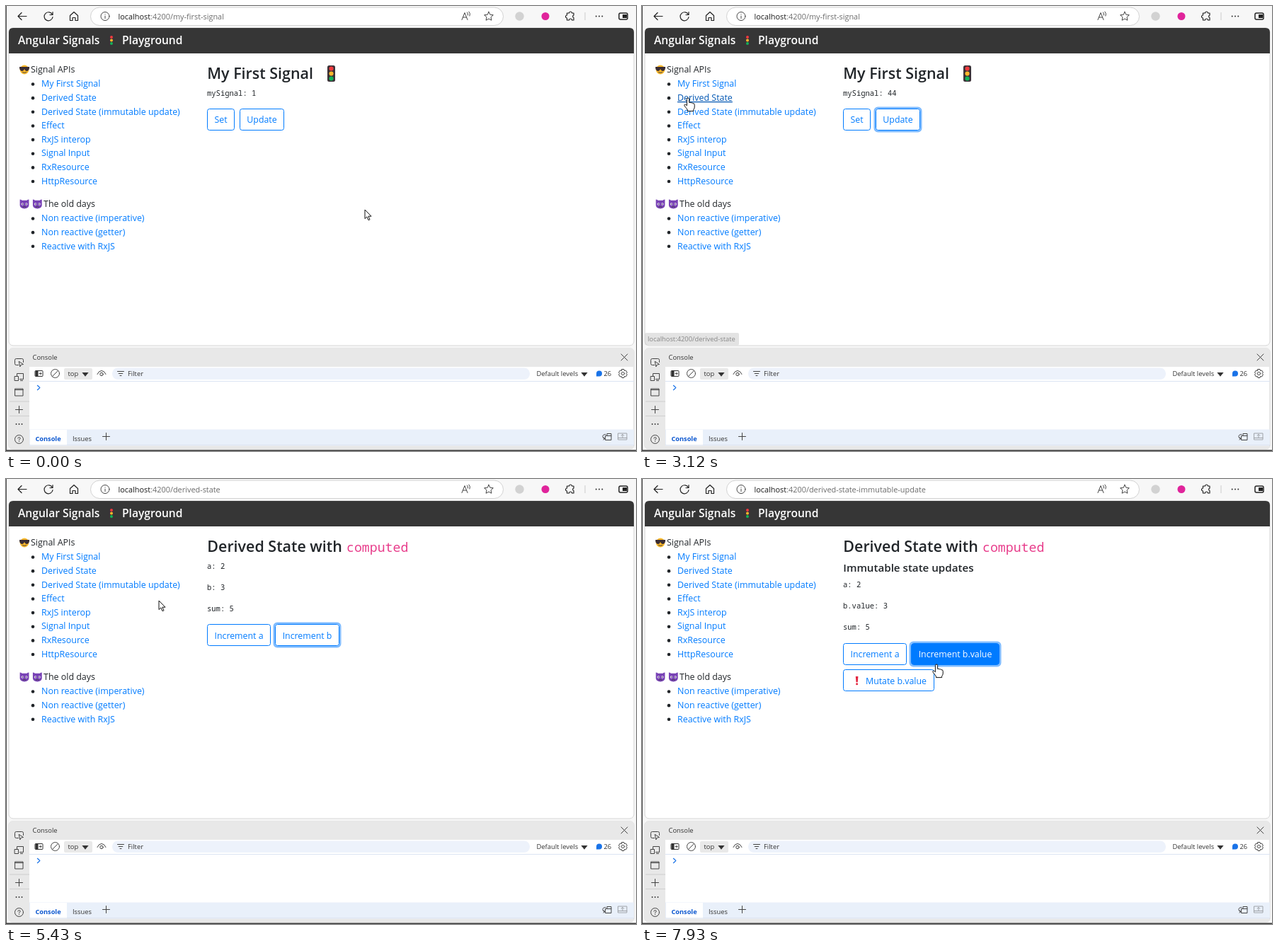
Recreate the animation shown at these times as an HTML page. Size 890 by 629 pixels, loop 8 s.

```html
<!DOCTYPE html>
<html lang="en">
<head>
<meta charset="utf-8">
<title>Angular Signals Playground</title>
<style>
html, body { margin: 0; width: 100%; height: 100%; overflow: hidden; background: #f7f7f7; }
svg { display: block; width: 890px; height: 629px; }
text { font-family: "Open Sans", "Noto Sans", sans-serif; font-size: 12.45px; fill: #212529; white-space: pre; }
.mono { font-family: "Noto Sans Mono", monospace; font-size: 10.5px; }
.code { font-family: "Noto Sans Mono", monospace; font-size: 18.2px; fill: #e83e8c; }
.brand { font-size: 15.6px; font-weight: 600; fill: #fff; }
.h2 { font-size: 21.45px; font-weight: 600; }
.h3 { font-size: 15.15px; font-weight: 600; }
.link { fill: #007bff; }
.on { text-decoration: underline; fill: #0056b3; }
.btn { font-size: 12.35px; text-anchor: middle; fill: #007bff; }
.btn.hot { fill: #fff; }
.url { font-size: 10.9px; fill: #6b6b6b; }
.ui { font-size: 9.4px; fill: #333; }
.tab { font-size: 9.2px; font-weight: 700; fill: #0b57d0; }
.tip { font-size: 9.35px; fill: #111; }
.i { fill: none; stroke: #444; stroke-width: 1; stroke-linecap: round; stroke-linejoin: round; }
.n { stroke: #222; stroke-width: 1.2; }
.blue { stroke: #1a73e8; stroke-width: 1.2; }
</style>
</head>
<body>
<svg viewBox="0 0 890 629"><g id="chrome"></g><g id="live"></g></svg>
<script>
const LOOP = 8000;
const BLUE = '#007bff';

const text = (x, y, str, cls = '') => `<text x="${x}" y="${y}" class="${cls}">${str}</text>`;
const rect = (x, y, w, h, fill, r = 0, more = '') =>
  `<rect x="${x}" y="${y}" width="${w}" height="${h}" rx="${r}" fill="${fill}" ${more}/>`;
const dot = (x, y, r, fill) => `<circle cx="${x}" cy="${y}" r="${r}" fill="${fill}"/>`;
const ring = (x, y, r, cls = 'i') => `<circle cx="${x}" cy="${y}" r="${r}" class="${cls}"/>`;
const icon = (x, y, d, cls = 'i') => `<path transform="translate(${x} ${y})" d="${d}" class="${cls}"/>`;
const shape = (x, y, d, fill) => `<path transform="translate(${x} ${y})" d="${d}" fill="${fill}"/>`;
const dots = (x, y, gap, r) => [-gap, 0, gap].map(d => dot(x + d, y, r, '#333')).join('');

const trafficLight = (x, y, s) => `<g transform="translate(${x} ${y}) scale(${s})">` +
  rect(-5.5, -11.5, 11, 23, '#3b3238', 2.5) +
  dot(0, -7, 3.1, '#f03a3e') + dot(0, 0, 3.1, '#fcb72b') + dot(0, 7, 3.1, '#12b358') + '</g>';

const coolFace = (x, y) => dot(x, y, 6.4, '#fdb92c') +
  shape(x, y, 'M-7-4H7V-2Q6 2 3 2 1 2 0-1-1 2-3 2-6 2-7-2Z', '#3a2d33') +
  icon(x, y, 'M-2.6 3.7Q0 5.2 2.6 3.7');

const imp = (x, y) =>
  shape(x, y, 'M-6.4-6.4Q-4.6-6.4-3.4-5.2H3.4Q4.6-6.4 6.4-6.4V2Q5.4 6.4 0 6.4T-6.4 2Z', '#7842b5') +
  dot(x - 2.8, y, 1.7, '#e9dcf5') + dot(x + 2.8, y, 1.7, '#e9dcf5') +
  dot(x - 2.5, y, .8, '#33204a') + dot(x + 2.5, y, .8, '#33204a') +
  icon(x, y, 'M-2 4Q0 3 2 4');

function browserBar() {
  return rect(0, 0, 890, 629, '#f7f7f7') +
    icon(23, 14.5, 'M6 0H-6M-1-5L-6 0L-1 5', 'i n') +
    icon(60, 14.5, 'M5.6-2A6 6 0 1 0 6 1M6-6V-2H2', 'i n') +
    icon(96, 14.5, 'M-5.5-1L0-6L5.5-1V6H2V2H-2V6H-5.5Z', 'i n') +
    rect(119.5, 2, 583, 25.5, '#fff', 12.7, 'stroke="#d2d2d2"') +
    ring(140, 14.5, 6) + icon(140, 14.5, 'M0-.5V3M0-3V-2.8') +
    icon(648, 14.5, 'M-4 5L0-5L4 5M-2.6 1.5H2.6M3.5-5.5Q5-4 4.4-1.5M6-6.5Q8.5-4 7-.5') +
    icon(682, 14.5, 'M0-6.3L1.9-2.3 6.3-1.8 3 1.3 3.9 5.7 0 3.5-3.9 5.7-3 1.3-6.3-1.8-1.9-2.3Z') +
    dot(725.5, 14.5, 6.2, '#d2d2d2') + dot(762, 14.5, 5.5, '#e0249b') +
    icon(797, 14.5, 'M-4.5-4.5H-1.5A2 2 0 0 1 2.5-4.5H5V-1.5A1.8 1.8 0 0 0 5 2V5.5H2.5A2 2 0 0 0-1.5 5.5H-4.5V2.5A2 2 0 0 1-4.5-1.5Z', 'i n') +
    rect(817.5, 9, 1, 11, '#ccc') + dots(838, 14.5, 4.3, 1) +
    rect(866, 10, 12, 9, '#fff', 2, 'stroke="#222" stroke-width="1.5"') + rect(871, 12, 6, 5, '#222');
}

function devtools() {
  return rect(4, 484, 883, 142, '#fff', 5, 'stroke="#d5d5d5"') +
    shape(0, 0, 'M4 489Q4 484 9 484H882Q887 484 887 489V510H33V622H887Q887 626 882 626H9Q4 626 4 621Z', '#e8e8e8') +
    text(37.5, 500, 'Console', 'ui') + icon(873.5, 496.5, 'M-4.5-4.5L4.5 4.5M4.5-4.5L-4.5 4.5') +
    // left rail
    icon(18.5, 503.5, 'M-1 4H-4Q-6 4-6 2V-3Q-6-5-4-5H4Q6-5 6-3V0M0-1L6 3L3 3.5L1.5 6Z') +
    icon(18.5, 524.5, 'M-3-1V-5H6V3H1M-6-1H-1V5H-6ZM2 5H5') +
    icon(18.5, 546, 'M-5.5-5H5.5V5H-5.5ZM-5.5-3.5H5.5') +
    rect(5, 558.5, 28, 1, '#cfcfcf') + rect(5, 579, 28, 1, '#cfcfcf') +
    icon(18.5, 570.5, 'M-5 0H5M0-5V5') + dots(18.5, 591, 4, .9) +
    ring(18.5, 612.5, 6) + icon(18.5, 612.5, 'M-1.6-1.4Q-1.4-3 0-3T1.6-1.4Q1.6-.4 0 .6V1.2M0 3V3.2') +
    // filter row
    rect(41, 515.5, 11, 8, 'none', 1, 'stroke="#333"') + rect(41.5, 516, 4, 7, '#333') +
    icon(48.5, 519.5, 'M-1.5 0H1.5M0-1.5L1.5 0L0 1.5') +
    ring(69.5, 519.5, 6) + icon(69.5, 519.5, 'M4-4L-4 4') +
    rect(82, 512, 40, 16, '#e9e9e9', 2) + text(87.5, 523, 'top', 'ui') +
    shape(112, 520.5, 'M-4.6-2.5H4.6L0 3.3Z', '#333') +
    icon(135, 519.5, 'M-6 1Q-4-4 0-4T6 1') + ring(135, 520.5, 2.2) +
    rect(150, 511.5, 590, 16.5, '#edf2fb', 8) +
    icon(162, 519.5, 'M-4.5-3H4.5M-2.8 0H2.8M-1 3H1') + text(172, 523, 'Filter', 'ui') +
    text(749.5, 523, 'Default levels', 'ui') + shape(817, 520.5, 'M-4.6-2.5H4.6L0 3.3Z', '#333') +
    shape(838, 519.5, 'M-4 4V0A4 4 0 1 1 0 4Z', '#1a73e8') + text(844.5, 523, '26', 'ui') +
    ring(871.5, 519.5, 2.1) +
    icon(871.5, 519.5, 'M-1.5-6H1.5L2-4 4-4.5 6-1.5 4.6 0 6 1.5 4 4.5 2 4 1.5 6H-1.5L-2 4-4 4.5-6 1.5-4.6 0-6-1.5-4-4.5-2-4Z') +
    rect(33, 530, 854, 1, '#dbe4f3') + icon(46, 539.5, 'M-1.6-3.2L1.8 0L-1.6 3.2', 'i blue') +
    // drawer tabs
    rect(33, 598.5, 854, 22.5, '#e9f0fa') + rect(34, 599, 52, 22, '#fff') + rect(33, 620.5, 854, 1, '#d3dcea') +
    text(41.5, 615, 'Console', 'tab') + text(94, 615, 'Issues', 'ui') +
    icon(141.5, 608.5, 'M-5 0H5M0-5V5') +
    icon(849, 608.5, 'M-2-1H6V5H-2ZM0-1V-4H6V-1M-2-3Q-6-3-6 0T-3 3M-5 1.5L-3 3L-5 4.5') +
    `<g opacity=".45">${icon(871, 608.5, 'M-6-4.5H6V4.5H-6ZM-6 2H6M-2-1L0-3L2-1M0-3V1')}</g>` +
    rect(0, 0, 1, 629, '#555') + rect(0, 627.5, 890, 1.5, '#3a3a3a');
}

function pageFrame() {
  return rect(4, 31, 883, 449, '#fff', 6, 'stroke="#d6d6d6"') +
    shape(0, 0, 'M4 67V37Q4 31 10 31H881Q887 31 887 37V67Z', '#363636') +
    text(17, 54, 'Angular Signals', 'brand') + trafficLight(149, 48.5, .64) + text(164, 54, 'Playground', 'brand') +
    coolFace(26, 90) + text(35, 94, 'Signal APIs') +
    imp(26, 280) + imp(44.3, 280) + text(53, 284, 'The old days');
}

const menu = [
  [110, ['My First Signal', 'Derived State', 'Derived State (immutable update)', 'Effect',
    'RxJS interop', 'Signal Input', 'RxResource', 'HttpResource']],
  [300, ['Non reactive (imperative)', 'Non reactive (getter)', 'Reactive with RxJS']]
];
const links = menu.flatMap(([top, labels]) => labels.map((label, i) => ({ label, y: top + i * 19.65 })));

const sums = name => n => {
  const a = n > 0 ? 2 : 1, b = n > 1 ? 3 : 2;
  return [`a: ${a}`, `${name}: ${b}`, `sum: ${a + b}`];
};
const button = (label, x, y, w) => ({ label, x, y, w });
const derivedHead = text(284.3, 103, 'Derived State with', 'h2') + text(481, 103, 'computed', 'code');

// clicks: [time, button index]
const views = [
  {
    at: 0, path: 'my-first-signal', top: 127,
    head: text(284.3, 103, 'My First Signal', 'h2') + trafficLight(459.5, 95.5, 1),
    rows: n => [`mySignal: ${[1, 42, 43, 44][n]}`],
    buttons: [button('Set', 284, 145, 39), button('Update', 330, 145, 63)],
    clicks: [[980, 0], [2200, 1], [2500, 1]]
  },
  {
    at: 3390, path: 'derived-state', top: 127,
    head: derivedHead,
    rows: sums('b'),
    buttons: [button('Increment a', 284, 205.4, 90), button('Increment b', 380, 205.4, 91)],
    clicks: [[4320, 0], [5160, 1]]
  },
  {
    at: 6210, path: 'derived-state-immutable-update', top: 153,
    head: derivedHead + text(284.3, 131, 'Immutable state updates', 'h3'),
    rows: sums('b.value'),
    buttons: [button('Increment a', 284, 231.6, 90), button('Increment b.value', 380, 231.6, 125),
      { ...button('Mutate b.value', 284, 269.3, 129), alert: true }],
    clicks: [[7180, 0], [7660, 1]]
  }
];

const ticks = [[0, 0, 1], [440, 1250, 7], [1510, 1780, 3], [2200, 3120, 7], [3240, 3240, 1],
  [3390, 4080, 6], [4320, 4320, 1], [4470, 4790, 3], [5160, 5430, 3], [5550, 6090, 5],
  [6210, 6330, 2], [6610, 6610, 1], [6850, 7510, 7], [7660, 7930, 3]]
  .flatMap(([a, b, n]) => Array.from({ length: n }, (_, i) => n > 1 ? a + (b - a) * i / (n - 1) : a));

const track = [[360, 507, 288], [845, 303, 158], [1375, 304, 158], [1780, 352, 160], [2520, 352, 160],
  [3120, 65, 130], [3400, 65, 130], [4080, 310, 213], [4320, 310, 213], [4790, 400, 216],
  [5160, 400, 216], [5430, 216, 172], [5685, 140, 149], [6400, 136, 148], [6610, 226, 182],
  [6960, 300, 236], [7300, 302, 240], [7510, 400, 248], [7660, 402, 250], [7930, 416, 262]];

// status bubble: [shown, solid, hidden, path, width]
const tips = [[3120, 3240, 3750, 'derived-state', 133],
  [6210, 6330, 6900, 'derived-state-immutable-update', 218]];

function pointer(t) {
  const k = track.findIndex(p => p[0] > t);
  if (k === 0) return track[0].slice(1);
  if (k < 0) return track[track.length - 1].slice(1);
  const [t0, x0, y0] = track[k - 1], [t1, x1, y1] = track[k];
  const f = (t - t0) / (t1 - t0);
  return [x0 + (x1 - x0) * f, y0 + (y1 - y0) * f];
}

function drawButton(b, hot, glow) {
  const y = Math.round(b.y);
  const shift = b.alert ? 10.5 : 0;
  let out = '';
  if (glow > 0) out += rect(b.x - 1.2, y - 1.2, b.w + 2.4, 33.4, 'none', 4.4,
    `stroke="${BLUE}" stroke-opacity="${glow * .5}" stroke-width="2.6"`);
  out += rect(b.x + .5, y + .5, b.w - 1, 30, hot ? BLUE : '#fff', 3, `stroke="${BLUE}"`);
  out += text(b.x + b.w / 2 + shift, Math.round(b.y + 20.3), b.label, hot ? 'btn hot' : 'btn');
  if (b.alert) out += shape(303.6, 285, 'M-1.8-6H1.8L1.1 2.2H-1.1Z', '#e3263f') + dot(303.6, 289.7, 1.5, '#e3263f');
  return out;
}

function drawPointer(x, y, hand) {
  const d = hand
    ? 'M-1.6 1.5Q-1.6 0 0 0T1.6 1.5V6.4Q3.2 5.6 4.3 6.9 5.9 6.2 6.8 7.7 9.2 7.2 9.2 9.7V13Q9.2 15 7.6 16.6V18.6H-.6V17Q-2 14.6-4.4 12-6 9.9-4.7 9.2-3.3 8.6-1.6 10.8Z'
    : 'M0 0V12.6L2.9 9.9L5 14.7L7 13.8L4.9 9.2H9Z';
  return `<path transform="translate(${x} ${y})" d="${d}" fill="#fff" stroke="#111" stroke-linejoin="round"/>`;
}

function render(t) {
  const view = views.filter(v => t >= v.at).pop();
  const done = view.clicks.filter(c => t >= c[0]);
  const last = done[done.length - 1], prev = done[done.length - 2];
  const glow = !last ? 0 : prev && prev[1] === last[1] ? 1 : Math.min(1, (t - last[0]) / 120);
  const [x, y] = pointer(t);
  let hand = false;
  const over = hit => { hand = hand || hit; return hit; };

  let out = `<text x="158.5" y="18.7" class="url"><tspan fill="#1b1b1b">localhost</tspan>:4200/${view.path}</text>`;
  for (const l of links) {
    const hot = over(Math.abs(y - l.y) < 8 && x > 50 && x < 50 + l.label.length * 6.2);
    out += dot(38, l.y + .5, 2.3, '#212529') + text(50, Math.round(l.y + 4.2), l.label, hot ? 'link on' : 'link');
  }
  out += view.head;
  view.rows(done.length).forEach((row, i) => out += text(284, view.top + i * 30.2, row, 'mono'));
  view.buttons.forEach((b, i) => {
    const hot = over(x > b.x && x < b.x + b.w && y > b.y && y < b.y + 31);
    out += drawButton(b, hot, last && last[1] === i ? glow : 0);
  });
  for (const [from, solid, end, path, w] of tips) {
    if (t < from || t >= end) continue;
    out += `<g opacity="${t < solid ? .5 : 1}">` + rect(4, 462, w, 17.5, '#c9c9c9', 2) +
      text(8, 474.3, 'localhost:4200/' + path, 'tip') + '</g>';
  }
  return out + drawPointer(x, y, hand);
}

document.getElementById('chrome').innerHTML = browserBar() + pageFrame() + devtools();

const live = document.getElementById('live');
let shown = -1;
function frame() {
  const now = performance.now() % LOOP;
  const t = ticks.filter(k => k <= now + .5).pop();
  if (t !== shown) live.innerHTML = render(shown = t);
  requestAnimationFrame(frame);
}
frame();
</script>
</body>
</html>
```
